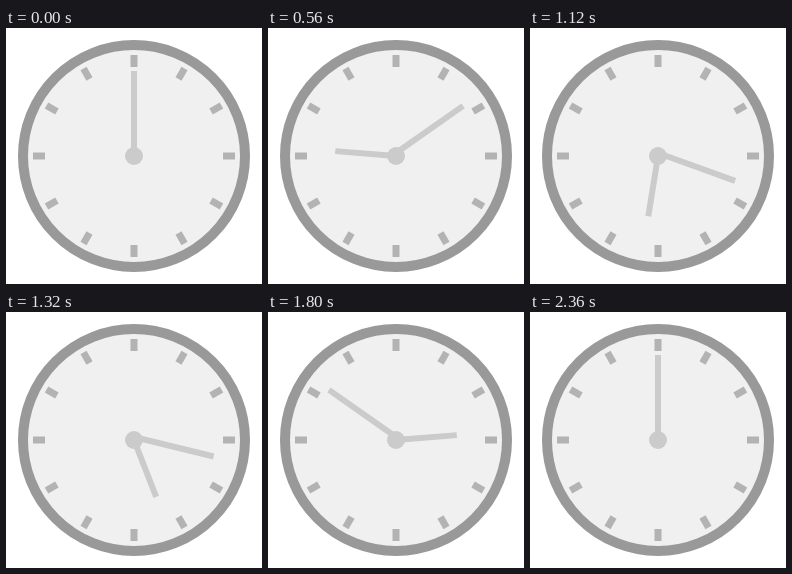
Recreate the animation shown at these times as an HTML page. Size 256 by 256 pixels, loop 2.4 s.

```html
<!DOCTYPE html>
<html lang="en">
<head>
<meta charset="utf-8">
<title>Clock running backwards</title>
<style>
  html, body { margin: 0; width: 100%; height: 100%; overflow: hidden; background: #fff; }
  svg { display: block; width: 100vw; height: 100vh; }
  .face { fill: #f0f0f0; stroke: #999; stroke-width: 10; }
  .ticks { fill: none; stroke: #b3b3b3; stroke-width: 12; }
  .hands { fill: #cbcbcb; }
  /* 60 poses with both end poses shown; the tiny delay keeps clear of step edges */
  .hand { animation: 2400ms steps(60, jump-none) -1ms infinite; }
  .hour { transform-origin: 128px 128px; animation-name: hour; }
  .minute { transform-origin: 128px 125px; animation-name: minute; }
  @keyframes hour { from { transform: rotate(0deg); } to { transform: rotate(-360deg); } }
  @keyframes minute { from { transform: rotate(0deg); } to { transform: rotate(-4320deg); } }
</style>
</head>
<body>
<svg viewBox="0 0 256 256">
  <defs>
    <path id="tick" d="M124.5 33h7"/>
    <g id="quarter">
      <use href="#tick"/>
      <use href="#tick" transform="rotate(30 128 128)"/>
      <use href="#tick" transform="rotate(60 128 128)"/>
    </g>
  </defs>
  <circle class="face" cx="128" cy="128" r="111"/>
  <g class="ticks">
    <use href="#quarter"/>
    <use href="#quarter" transform="rotate(90 128 128)"/>
    <use href="#quarter" transform="rotate(180 128 128)"/>
    <use href="#quarter" transform="rotate(270 128 128)"/>
  </g>
  <g class="hands">
    <rect class="hand hour" x="125" y="67" width="6" height="61"/>
    <rect class="hand minute" x="125" y="43" width="6" height="82"/>
    <circle cx="128" cy="128" r="9"/>
  </g>
</svg>
</body>
</html>
```
